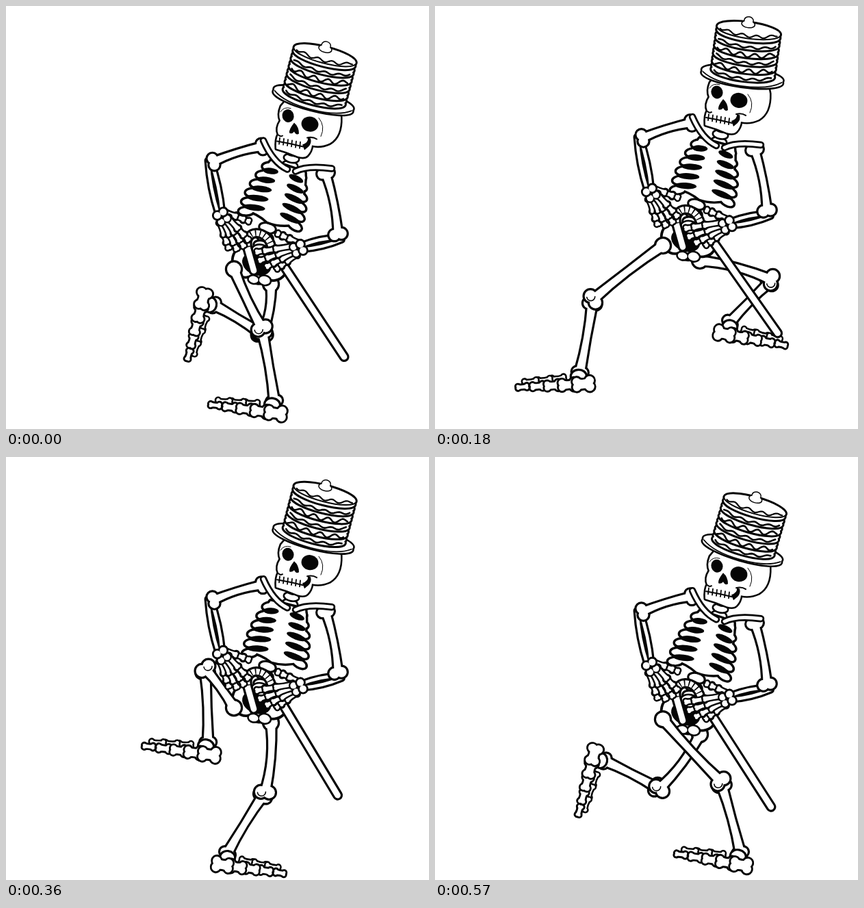
These frames come from a looping animation (618 px wide and 618 px high, 600 ms). An HTML page with a canvas:

```html
<!DOCTYPE html>
<html lang="en">
<head>
<meta charset="utf-8">
<title>Dancing skeleton</title>
<style>
  html, body { margin: 0; width: 100%; height: 100%; overflow: hidden; background: #fff; }
  canvas { display: block; width: 618px; height: 618px; }
</style>
</head>
<body>
<canvas id="stage" width="618" height="618"></canvas>
<script>
const ctx = document.getElementById('stage').getContext('2d');
const LOOP = 600, STEP = 30;
const INK = '#050505', BONE = '#fff';
const rad = deg => deg * Math.PI / 180;
const polar = (deg, len) => [Math.cos(rad(deg)) * len, Math.sin(rad(deg)) * len];

// Motion: two harmonics of the loop, phases in degrees
function wave(t, mean, amp, phase = 0, amp2 = 0, phase2 = 0) {
  const turn = 360 * t / LOOP;
  return mean + amp * Math.cos(rad(turn - phase)) + amp2 * Math.cos(rad(2 * turn - phase2));
}

// Smooth closed path of an ankle through its key poses
const TIMES = [0, 120, 240, 330, 420, 480, 570];
function spline(v, t) {
  const n = TIMES.length;
  const wrap = k => (k + n) % n;
  const time = k => TIMES[wrap(k)] + LOOP * Math.floor(k / n);
  const gap = k => time(k + 1) - time(k);
  const slope = k => (v[wrap(k + 1)] - v[wrap(k)]) / gap(k);
  const tangent = k => (slope(k - 1) * gap(k) + slope(k) * gap(k - 1)) / (gap(k) + gap(k - 1));
  let i = n - 1;
  while (TIMES[i] > t) i--;
  const h = gap(i), s = (t - TIMES[i]) / h, s2 = s * s, s3 = s2 * s;
  return (2 * s3 - 3 * s2 + 1) * v[i] + (s3 - 2 * s2 + s) * h * tangent(i)
    + (3 * s2 - 2 * s3) * v[wrap(i + 1)] + (s3 - s2) * h * tangent(i + 1);
}
const track = (...pts) => t => [0, 1].map(k => spline(pts.map(p => p[k]), t));

const front = {
  side: 1, bend: 3, hip: [333, 150],
  ankle: track([392, 577], [261, 577], [190, 483], [242, 423], [409, 424], [432, 455], [446, 578]),
  shin: t => polar(wave(t, -94, 20, 126, 6), 108),
  pitch: t => wave(t, 187, 8, 288)
};
const rear = {
  side: -1, bend: -9, hip: [387, 172],
  ankle: track([304, 437], [412, 399], [425, 536], [367, 577], [237, 567], [233, 536], [248, 444]),
  shin: t => polar(wave(t, -24, 46, 0, 9), wave(t, 95, 18, 260, -10)),
  pitch: t => wave(t, 40, 48, -9, 16, -18)
};

const add = (p, x, y) => [p[0] + x, p[1] + y];
const mix = (a, b, s) => [a[0] + (b[0] - a[0]) * s, a[1] + (b[1] - a[1]) * s];
function normal(a, b) {
  const dx = b[0] - a[0], dy = b[1] - a[1], d = Math.hypot(dx, dy) || 1;
  return [-dy / d, dx / d];
}
const along = (p, n, d) => [p[0] + n[0] * d, p[1] + n[1] * d];

function disc(p, rx, ry = rx, turn = 0) {
  const path = new Path2D();
  path.ellipse(p[0], p[1], rx, ry, turn, 0, 7);
  return path;
}
// Union of parts with one shared outline
function shape(parts, line = 3.2) {
  ctx.strokeStyle = INK;
  ctx.lineWidth = line * 2;
  parts.forEach(p => ctx.stroke(p));
  ctx.fillStyle = BONE;
  parts.forEach(p => ctx.fill(p));
}
function stroke(path, width, color = INK) {
  ctx.strokeStyle = color;
  ctx.lineWidth = width;
  ctx.stroke(path);
}
function ink(path) {
  ctx.fillStyle = INK;
  ctx.fill(path);
}
function curve(a, ctrl, b) {
  const path = new Path2D();
  path.moveTo(...a);
  path.quadraticCurveTo(...ctrl, ...b);
  return path;
}
function local(p, turn, draw) {
  ctx.save();
  ctx.translate(p[0], p[1]);
  ctx.rotate(turn);
  draw();
  ctx.restore();
}

function shaft(a, b, w, bend) {
  const n = normal(a, b), m = mix(a, b, .5);
  const wide = w * 1.35, slim = w * .6;
  const path = curve(along(a, n, wide), along(m, n, bend + slim), along(b, n, wide));
  path.lineTo(...along(b, n, -wide));
  path.quadraticCurveTo(...along(m, n, bend - slim), ...along(a, n, -wide));
  path.closePath();
  return path;
}
function bone(a, b, w, ra, rb = ra, bend = 0, line = 3.2) {
  const n = normal(a, b);
  const knobs = (p, r) => [disc(along(p, n, r * .7), r), disc(along(p, n, -r * .7), r)];
  shape([shaft(a, b, w, bend), ...knobs(a, ra), ...knobs(b, rb)], line);
}

function foot(ankle, pitch, side) {
  ctx.save();
  ctx.translate(...ankle);
  ctx.rotate(rad(pitch));
  ctx.scale(1, -side);
  ctx.translate(-22, 17);
  if (side < 0) ctx.scale(.95, 1);
  for (let i = 0; i < 3; i++) bone([46 + i * 20, -9 + i * 2], [63 + i * 20, -7 + i * 2], 2.2, 2.6, 2.6, 0, 2.6);
  shape([disc([24, -11], 10, 8)]);
  // Toe, metatarsal, tarsal and heel shrink towards the tip
  for (let i = 4; i >= 0; i--) {
    const x = 8 + i * 23, r = 6.4 - i;
    bone([x, i * .7], [x + 19 - i * 1.5, i * .7 + 1], r, r, r * .9, 0, 2.9);
  }
  ctx.restore();
}
function leg(part, chest, t) {
  const hip = add(chest, part.hip[0] - chest[0], part.hip[1]);
  const ankle = part.ankle(t), knee = add(ankle, ...part.shin(t));
  bone(mix(knee, ankle, .06), ankle, 4.7, 7.5, 6.5, -2 * part.side);
  foot(ankle, part.pitch(t), part.side);
  const n = normal(hip, knee);
  shape([shaft(hip, knee, 4.8, part.bend), disc(hip, 10),
    disc(along(knee, n, 6), 8.5), disc(along(knee, n, -6), 8.5)]);
  const crease = new Path2D();
  crease.arc(...along(knee, n, 5), 6, 0, 3);
  stroke(crease, 1.6);
}

function forearm(a, b) {
  const n = normal(a, b), m = mix(a, b, .5);
  const pair = [5, -5].map(d => curve(along(a, n, d * .4), along(m, n, d * 1.5), along(b, n, d * .6)));
  pair.forEach(p => stroke(p, 11));
  stroke(curve(a, m, b), 8);
  pair.forEach(p => stroke(p, 4.6, BONE));
}
function finger(a, b) {
  const stops = [0, .48, .78, 1];
  for (let i = 2; i >= 0; i--) bone(mix(a, b, stops[i]), mix(a, b, stops[i + 1]), 2.6, 2.8, 2.3, 0, 2.5);
}
// Fingers fan out from the wrist by a fixed angle each
function hand(wrist, start, fan, reach, shrink, thumb) {
  const heading = start + fan * 1.5;
  const palm = add(wrist, ...polar(heading, 11)), n = normal(wrist, palm);
  finger(along(wrist, n, -Math.sign(fan) * 6), add(wrist, ...thumb));
  for (let i = 3; i >= 0; i--) {
    const root = along(palm, n, (i - 1.5) * 4.5 * Math.sign(fan));
    finger(root, add(wrist, ...polar(start + fan * i, reach + 4 * (i % 3 > 0) - shrink * i)));
  }
  const row = (p, r) => [-5, 5].map(d => disc(along(p, n, d), r));
  shape(row(palm, 4.6), 2.4);
  shape(row(wrist, 5), 2.8);
}

function ribs() {
  const mid = -5, count = 5, pitch = 14.5;
  const reach = y => 29 + 17 * Math.sin(Math.min(y, 70) / 70 * Math.PI / 2);
  const sides = draw => [-1, 1].forEach(side => draw(side));
  const cage = [new Path2D('M-28 0 Q-42 30 -43 78 Q-24 78 -8 86 Q12 88 31 78 Q34 30 24 2 Z')];
  sides(side => {
    for (let i = 0; i <= count; i++) {
      const y = 6 + i * pitch;
      cage.push(disc([mid + side * (reach(y) - 9), y + 2], 10, 4.8, side * .3));
    }
  });
  shape(cage, 3.4);
  sides(side => {
    for (let i = 0; i < count; i++) {
      const y = 13 + i * pitch, inner = 8 + i * .8, outer = reach(y) - 3;
      const half = (outer - inner) / 2;
      ink(disc([mid + side * (inner + half), y + 1], half, 4.6, side * .16));
    }
  });
}

function pelvis(p) {
  local(p, .2, () => {
    shape([disc([-19, 4], 17, 21, -.3), disc([20, 2], 21, 19, .4), disc([4, 20], 12, 10)], 3.8);
    ink(disc([-2, 4], 22, 16, .2));
    shape([disc([14, 25], 8, 6), disc([-2, 27], 7, 5)], 2.6);
    shape([disc([0, -16], 12, 8)], 2.6);
  });
}

function cane(top, end) {
  const path = new Path2D(), arch = new Path2D();
  path.moveTo(...end);
  path.lineTo(...add(top, 18, 20));
  arch.moveTo(...add(top, 18, 20));
  for (const p of [path, arch])
    p.bezierCurveTo(...add(top, 12, -8), ...add(top, -24, -8), ...add(top, -17, 22));
  path.lineTo(...add(top, -8, 54));
  stroke(path, 15);
  stroke(path, 8.6, BONE);
  ctx.save();
  ctx.lineCap = 'butt';
  ctx.setLineDash([1.6, 5]);
  stroke(arch, 9);
  ctx.restore();
}

function skull() {
  shape([new Path2D(`M-42 -26 Q-47 -14 -43 -5 Q-50 6 -46 15 Q-50 22 -49 36
    Q-34 40 -18 47 Q-8 50 -4 46 Q2 40 3 31 Q16 34 29 28 Q46 18 45 -10 Q42 -32 20 -38 L-30 -40 Z`)], 2.6);
  ink(disc([-32, -12], 8.5, 9.5, -.3));
  ink(disc([0, 0], 12.5, 11, .2));
  ink(new Path2D('M-23 -2 Q-31 8 -30 13 Q-26 15 -23 11 Q-20 17 -16 14 Q-16 4 -23 -2 Z'));
  ink(new Path2D('M-11 30 Q-2 27 -3 20 L1 21 Q3 28 -2 33 L-8 38 Z'));
  stroke(new Path2D('M-48 25 Q-30 28 -10 33 M-46 16 Q-43 19 -40 17 M-4 20 Q4 18 10 22'), 2);
  stroke(new Path2D('M13 -9 Q23 3 16 18 M-43 -18 Q-38 -26 -28 -23'), 1);
  const teeth = new Path2D();
  for (let x = -44; x < -10; x += 6) {
    const y = 26 + (x + 45) * .2;
    teeth.moveTo(x, y - 6);
    teeth.lineTo(x - 1, y + 3);
  }
  stroke(teeth, 1.8);
}

function hat() {
  shape([disc([0, 2], 59.5, 12.5), disc([0, -2], 59.5, 12)], 2.6);
  stroke(new Path2D('M-58 1 Q-40 14 0 14 Q40 14 58 1'), 1.8);
  const layers = 6, pitch = 11.6, rx = 46, ry = 11;
  // Syrup hangs from a rim in waves
  const syrup = (y, swing, phase) => {
    const path = new Path2D();
    for (let x = 4 - rx; x <= rx - 4; x += 2) {
      const rim = ry * Math.sqrt(1 - (x / rx) ** 2);
      path.lineTo(x, y + rim + swing * Math.sin(x * .3 + phase));
    }
    return path;
  };
  for (let i = 0; i < layers; i++) {
    const y = -5 - i * pitch;
    shape([disc([0, y], rx, ry), disc([0, y - 5], rx, ry)], 3);
    if (i < layers - 1) stroke(syrup(y - 3, i % 2 ? 3 : 1.5, i * 2.3), 2.6);
  }
  const top = -10 - (layers - 1) * pitch;
  shape([disc([0, top], rx, ry)], 2);
  stroke(syrup(top - 3, 2, 1), 2.2);
  shape([disc([-2, top - 9], 9, 4.5), disc([-2, top - 14], 6, 5)], 1.5);
}

function draw(t) {
  ctx.fillStyle = '#fff';
  ctx.fillRect(0, 0, 618, 618);
  ctx.lineCap = ctx.lineJoin = 'round';

  // The upper body rides rigidly on the chest, which bobs twice per loop
  const chest = [414, wave(t, 214, 0, 0, 21, -12)];
  const at = (x, y) => add(chest, x, y);
  const elbowL = at(-111, -7), wristL = at(-101, 69);
  const elbowR = at(71, 99), wristR = at(18, 118);
  const caneEnd = at(wave(t, 78, 10, 78), 278);

  leg(rear, chest, t);
  for (let i = 0; i < 3; i++) shape([disc(at(-32 - i * 4, 90 + i * 13), 11, 6, .25)], 3);
  pelvis(at(-45, 139));
  for (let i = 0; i < 3; i++) shape([disc(at(1 + i * 2, -2 - i * 10), 10, 5, .2)], 2.6);
  local(chest, rad(wave(t, 14, 2.5)), ribs);
  cane(at(-44, 98), caneEnd);
  leg(front, chest, t);

  forearm(add(elbowL, -6, -2), wristL);
  forearm(add(elbowR, 5, 6), wristR);
  bone(at(-40, -29), elbowL, 4.2, 6.5, 7, 5);
  bone(at(53, 10), elbowR, 4.2, 7, 7.5, -6);
  const collars = [curve(at(-3, 4), at(-24, -6), at(-38, -38)), curve(at(9, 7), at(26, -2), at(62, 3))];
  collars.forEach(p => stroke(p, 10.5));
  collars.forEach(p => stroke(p, 5, BONE));
  hand(wristL, 43, 11, 56, 1.5, [42, 11]);
  hand(wristR, 174, -11.5, 66, 6, [-35, -20]);

  const eye = at(30, -62);
  local(eye, 0, skull);
  local(add(eye, 5, -35), rad(wave(t, 13, -5, 108)), hat);
}

function tick(now) {
  draw(Math.floor(now % LOOP / STEP) * STEP);
  requestAnimationFrame(tick);
}
tick(performance.now());
</script>
</body>
</html>
```
